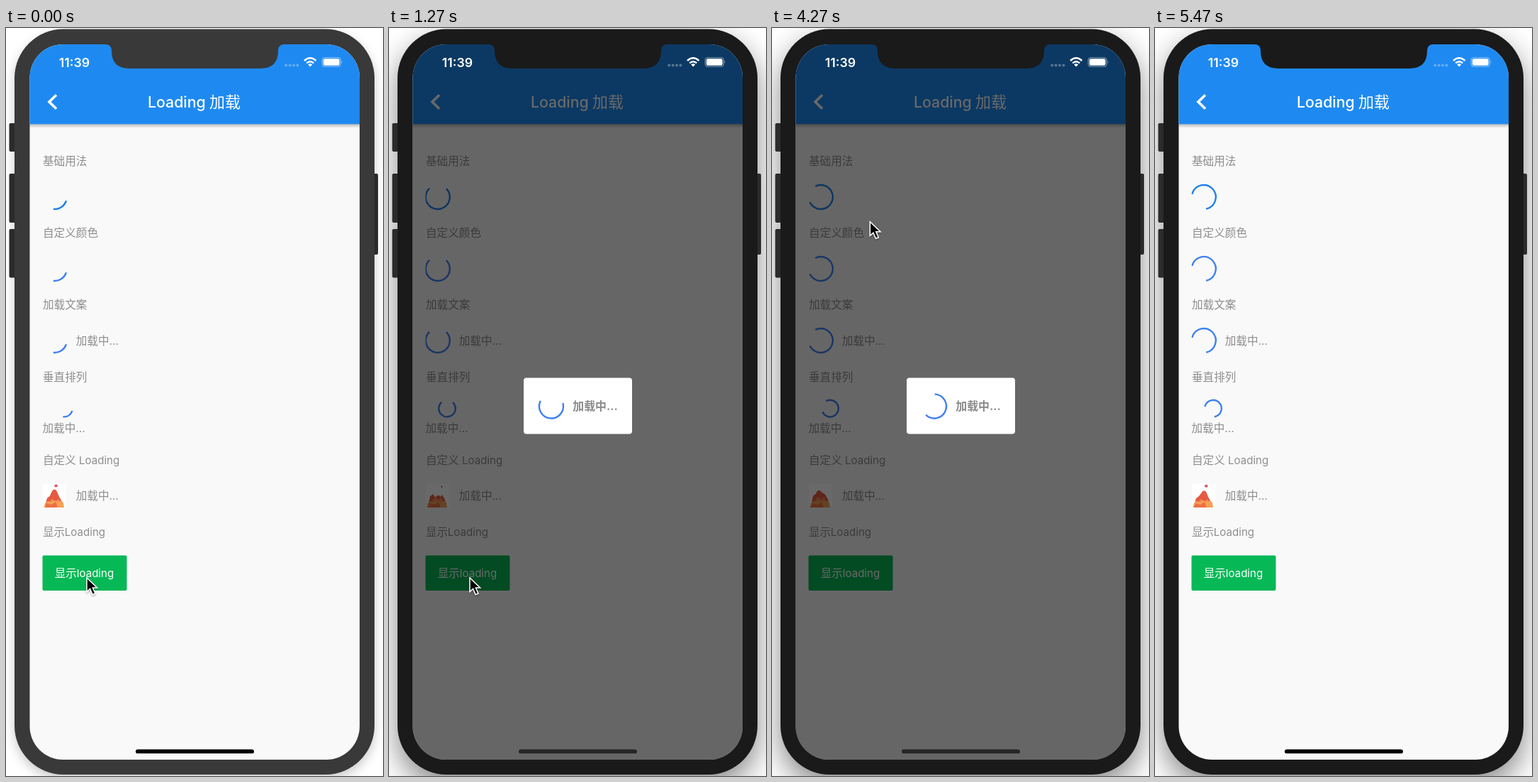
Animation, 532 px wide and 1053 px high, one loop 5.51 s. Source, as an HTML page:

```html
<!DOCTYPE html>
<html lang="zh">
<head>
<meta charset="utf-8">
<title>Loading</title>
<style>
  html, body { margin: 0; width: 100%; height: 100%; overflow: hidden; background: #fff; }
  svg { display: block; width: 532px; height: 1053px; }
  text { font-family: Inter, "Noto Sans CJK SC", "Noto Sans CJK", sans-serif; font-size: 15.6px; }
  .lat { font-size: 15.1px; }
  .gray { fill: #8e8e8e; }
  .arc { fill: none; stroke-linecap: square; stroke-width: 2.4; stroke: #3f80f2; }
</style>
</head>
<body>
<svg viewBox="0 0 532 1053" xmlns="http://www.w3.org/2000/svg">
  <defs>
    <clipPath id="screen"><rect x="33.5" y="23" width="465.5" height="1007" rx="47"/></clipPath>
    <clipPath id="rows"><rect x="51.5" y="210" width="60" height="260"/></clipPath>
    <clipPath id="tile"><rect x="52" y="641.5" width="33" height="33.5"/></clipPath>
    <linearGradient id="fall" x2="0" y2="1">
      <stop offset="0" stop-color="#000" stop-opacity=".26"/>
      <stop offset="1" stop-color="#000" stop-opacity="0"/>
    </linearGradient>
    <filter id="soft" x="-30%" y="-20%" width="160%" height="140%"><feGaussianBlur stdDeviation="8"/></filter>
    <filter id="wide" x="-30%" y="-20%" width="160%" height="140%"><feGaussianBlur stdDeviation="20"/></filter>
    <filter id="drop" x="-50%" y="-50%" width="200%" height="200%"><feDropShadow dx="0" dy="1.5" stdDeviation="1.2" flood-opacity=".35"/></filter>
  </defs>

  <rect width="532" height="1053" fill="#fff"/>
  <rect id="idleShadow" x="12" y="8" width="508" height="1049" rx="70" opacity=".22" filter="url(#soft)"/>
  <rect id="focusShadow" x="12" y="18" width="508" height="1049" rx="70" opacity=".48" filter="url(#wide)"/>

  <g fill="#2b2b2b">
    <rect x="4.5" y="134" width="12" height="40" rx="2"/>
    <rect x="4.5" y="205" width="12" height="69" rx="2"/>
    <rect x="4.5" y="283" width="12" height="68.5" rx="2"/>
    <rect x="514" y="205" width="11" height="114" rx="2"/>
  </g>
  <rect id="bezel" x="12" y="1.5" width="508" height="1049.5" rx="69"/>

  <g clip-path="url(#screen)">
    <rect x="33" y="23" width="467" height="1008" fill="#f9f9f9"/>
    <rect x="33" y="135" width="467" height="6" fill="url(#fall)"/>
    <rect x="33" y="23" width="467" height="112.3" fill="#1e8af1"/>
    <path d="M71 94.3L61 104L71 113.7" fill="none" stroke="#fff" stroke-width="3.6"/>
    <g fill="#fff" font-weight="500">
      <text x="200" y="111.8" style="font-size:21.3px">Loading</text>
      <text x="287" y="112" style="font-size:22px">加载</text>
    </g>
    <g id="labels" class="gray"></g>

    <g clip-path="url(#rows)">
      <path class="arc" id="a0" style="stroke:#1f80ea"/>
      <path class="arc" id="a1"/>
      <path class="arc" id="a2"/>
    </g>
    <path class="arc" id="a3"/>

    <g clip-path="url(#tile)">
      <rect x="51" y="641" width="35" height="35" fill="#fff"/>
      <path id="flame" fill="#e55a41"/>
      <path id="glow" fill="#f08a50"/>
      <path d="M53.5 675L55 669Q59 664 63 668Q68 663 73 667Q79 663 81 669L82 675Z" fill="#f5a155"/>
      <path d="M55 675L57 669L64 671L70 667L73 675Z" fill="#ee7044"/>
      <ellipse id="spark" fill="#e0545c"/>
    </g>

    <rect x="51.5" y="742.5" width="119" height="49.5" rx="2" fill="#07b856"/>
    <g fill="#fff">
      <text x="68.7" y="773.2">显示</text>
      <text x="99.8" y="773.2" class="lat">loading</text>
    </g>

    <rect id="dim" x="33" y="23" width="467" height="1008"/>
    <g id="dialog">
      <rect x="190" y="492.5" width="153" height="79" rx="4" fill="#fff"/>
      <path class="arc" id="a4"/>
      <text x="259.3" y="538.4" font-weight="700" style="font-size:15.9px" fill="#8a8a8a">加载中...</text>
    </g>

    <g fill="#fff">
      <text x="74.8" y="54.5" font-weight="600" style="font-size:17.8px">11:39</text>
      <g opacity=".3">
        <circle cx="395.2" cy="52.6" r="2"/><circle cx="400.6" cy="52.6" r="2"/>
        <circle cx="406" cy="52.6" r="2"/><circle cx="411.4" cy="52.6" r="2"/>
      </g>
      <g fill="none" stroke="#fff" stroke-width="2.5">
        <path d="M421 46Q429.2 38.6 437.4 46"/>
        <path d="M424.2 49.4Q429.2 45 434.2 49.4"/>
      </g>
      <path d="M426.2 51.4Q429.2 49 432.2 51.4L429.2 54.6Z"/>
      <rect x="446.2" y="41.7" width="26" height="12.6" rx="3.6" fill="none" stroke="#fff" stroke-opacity=".5" stroke-width="1.1"/>
      <rect x="447.8" y="43.3" width="22.8" height="9.4" rx="2.2"/>
      <path d="M473.6 46Q475.4 48 473.6 50Z" opacity=".6"/>
    </g>
    <rect id="home" x="183" y="1015.5" width="167" height="5.8" rx="2.9"/>
  </g>
  <path id="notch" d="M140 21V23Q149 23 149 32Q149 57 174 57H359Q384 57 384 32Q384 23 393 23V21Z"/>
  <path id="cursor" d="M0 0V19.6L4.6 15.4L8.2 23.6L11.9 22L8.4 14H14.6Z" stroke="#fff" stroke-width="1.5" filter="url(#drop)"/>
</svg>
<script>
const LOOP = 5510, FRAME = 100 / 3;
const FOCUS = 940, OPEN = 1010, CLOSE = 4420, FADE = 150;
const $ = id => document.getElementById(id);
const set = (id, attrs) => { for (const k in attrs) $(id).setAttribute(k, attrs[k]); };
const clamp = v => Math.min(1, Math.max(0, v));

function bezier(x1, y1, x2, y2) {
  const at = (a, b, s) => 3 * (1 - s) * (1 - s) * s * a + 3 * (1 - s) * s * s * b + s * s * s;
  return x => {
    if (x <= 0 || x >= 1) return clamp(x);
    let lo = 0, hi = 1;
    for (let i = 0; i < 24; i++) {
      const mid = (lo + hi) / 2;
      if (at(x1, x2, mid) < x) lo = mid; else hi = mid;
    }
    return at(y1, y2, lo);
  };
}
const fastOutSlowIn = bezier(0.4, 0, 0.2, 1);
const easeOut = bezier(0, 0, 0.58, 1);

const labels = [
  [52, 187, '基础用法'], [52, 288, '自定义颜色'], [52, 389.5, '加载文案'],
  [98.7, 440, '加载中...'], [52, 491, '垂直排列'], [51.5, 563, '加载中...'],
  [52, 608, '自定义'], [103, 608, 'Loading'], [98.7, 658.3, '加载中...'],
  [52, 709, '显示'], [82.8, 709, 'Loading']
];
$('labels').innerHTML = labels.map(([x, y, s]) =>
  `<text x="${x}" y="${y + 5.6}"${s === 'Loading' ? ' class="lat"' : ''}>${s}</text>`).join('');

// Material indeterminate spinner, one sweep per second
function arc(sec, cx, cy, r) {
  const step = Math.floor(sec), p = sec - step;
  const head = fastOutSlowIn(p * 2), tail = fastOutSlowIn(p * 2 - 1);
  const from = (-90 + tail * 270 + p * 306 - step * 144) * Math.PI / 180;
  const sweep = Math.max((head - tail) * 1.5 * Math.PI, 0.002);
  const pt = a => (cx + r * Math.cos(a)).toFixed(3) + ' ' + (cy + r * Math.sin(a)).toFixed(3);
  return `M${pt(from)}A${r} ${r} 0 ${sweep > Math.PI ? 1 : 0} 1 ${pt(from + sweep)}`;
}

const path = [
  [0, 114, 774], [1700, 114, 774], [2240, 62, 610], [2340, -40, 570],
  [4110, -40, 340], [4150, 80, 300], [4270, 140, 272], [4520, 137, 273],
  [4670, 126.5, 274], [4800, 62, 300], [4900, -40, 330], [LOOP, -40, 330]
];
function cursorAt(t) {
  const i = path.findIndex(k => k[0] > t), a = path[i - 1], b = path[i];
  const u = (t - a[0]) / (b[0] - a[0]);
  return [a[1] + (b[1] - a[1]) * u, a[2] + (b[2] - a[2]) * u];
}

function fire(t) {
  const p = t / 900 % 1, w = 2 * Math.PI * p;
  const top = 675 - (21.5 + 4.5 * Math.cos(w - 0.9 * 2 * Math.PI));
  const x = 68 + 2 * Math.sin(w);
  const side = 660 + 2 * Math.sin(w + 1);
  set('flame', { d: `M55 673L58 ${side}L62 ${side - 3}L${x - 3.5} ${top + 3}Q${x} ${top - 3} ${x + 3.5} ${top + 2}L75 ${side - 2}L79 ${side + 5}L81 673Z` });
  set('glow', { d: `M59 673L62 ${side + 4}L66 ${side + 1}L69 ${side + 6}L74 ${side + 1}L78 673Z` });
  const q = (p + 0.16) % 1, size = clamp((0.66 - q) * 6);
  set('spark', { cx: 67 + 7.5 * clamp(q * 3), cy: 644 + 3 * q, rx: 2.3 * size, ry: 2 * size });
}

function draw(now) {
  const t = Math.floor((now % LOOP + 4) / FRAME) * FRAME % LOOP;
  const focused = t >= FOCUS;
  const shade = focused ? '#1a1a1a' : '#393939';
  set('bezel', { fill: shade });
  set('notch', { fill: shade });
  set('idleShadow', { visibility: focused ? 'hidden' : 'visible' });
  set('focusShadow', { visibility: focused ? 'visible' : 'hidden' });

  const sec = t / 1000 + 2.13;
  [238, 339, 440].forEach((y, i) => set('a' + i, { d: arc(sec, 68.8, y, 17) }));
  set('a3', { d: arc(sec, 82, 535.6, 11.8) });

  const life = t < CLOSE ? clamp((t - OPEN) / FADE) : clamp(1 - (t - CLOSE) / FADE);
  const show = easeOut(life);
  set('dim', { opacity: 0.59 * show });
  set('dialog', { opacity: show });
  set('a4', { d: arc(Math.max(0, t - OPEN) / 1000, 229, 532.5, 17) });
  const g = Math.round(38 * show);
  set('home', { fill: `rgb(${g},${g},${g})` });

  fire(t);
  const [x, y] = cursorAt(t);
  set('cursor', { transform: `translate(${x.toFixed(2)} ${y.toFixed(2)})` });
}

function tick() {
  draw(performance.now());
  requestAnimationFrame(tick);
}
tick();
</script>
</body>
</html>
```
